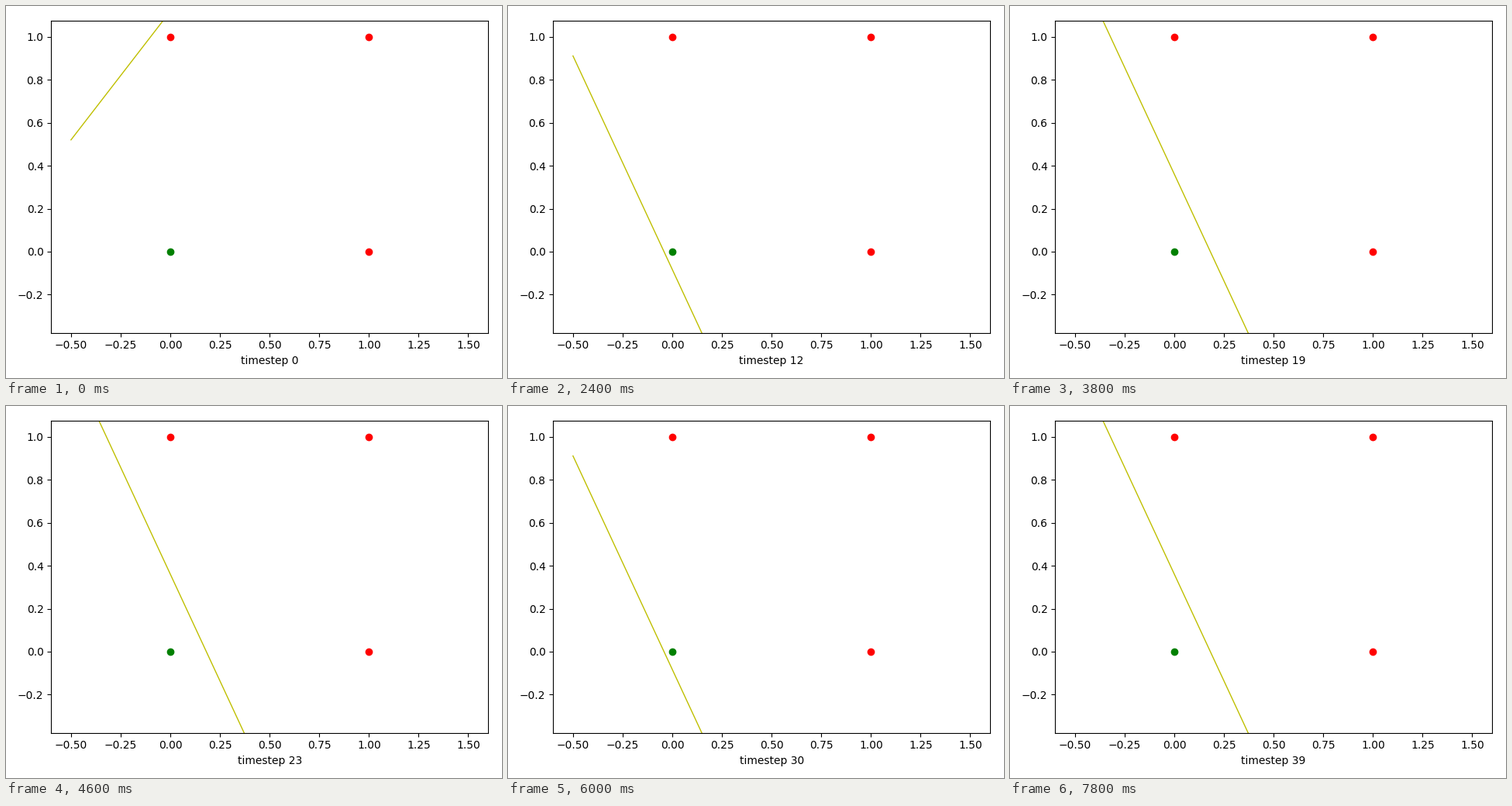
A matplotlib script that plays this animation: 640 px wide and 480 px high, repeating every 8000 ms.

```python
import numpy as np
import matplotlib.pyplot as plt
from matplotlib.animation import FuncAnimation

STEPS = 40
INTERVAL = 200

# Inputs with a leading 1 for the bias, and the OR targets.
inputs = np.array([[1, 0, 0], [1, 0, 1], [1, 1, 0], [1, 1, 1]], float)
targets = np.array([0, 1, 1, 1])


def train(weights, steps):
    """Return the weights (bias, x, y) after every perceptron update."""
    history = [weights]
    for _ in range(steps - 1):
        error = targets - np.sign(inputs @ weights)
        weights = weights + inputs.T @ error
        history.append(weights)
    return history


history = train(np.array([4.187, 4.48, -3.745]), STEPS)

fig, ax = plt.subplots(figsize=(6.4, 4.8), dpi=100)
for (_, px, py), target in zip(inputs, targets):
    ax.plot(px, py, "o", color="red" if target else "green")

xs = np.array([-0.5, 1.5])
boundary, = ax.plot(xs, xs, color="y", linewidth=1)

ax.set_xlim(-0.6, 1.6)
ax.set_ylim(-0.3775, 1.0737)
ax.set_xlabel("timestep 0")
fig.tight_layout()
fig.subplots_adjust(right=622.1 / 640, top=1 - 19.1 / 480)


def update(step):
    bias, wx, wy = history[step]
    boundary.set_ydata(-(bias + wx * xs) / wy)
    ax.set_xlabel(f"timestep {step}")
    return boundary,


def init():
    return update(0)


anim = FuncAnimation(fig, update, frames=STEPS, init_func=init,
                     interval=INTERVAL, repeat=True, repeat_delay=0)
plt.show()
```
